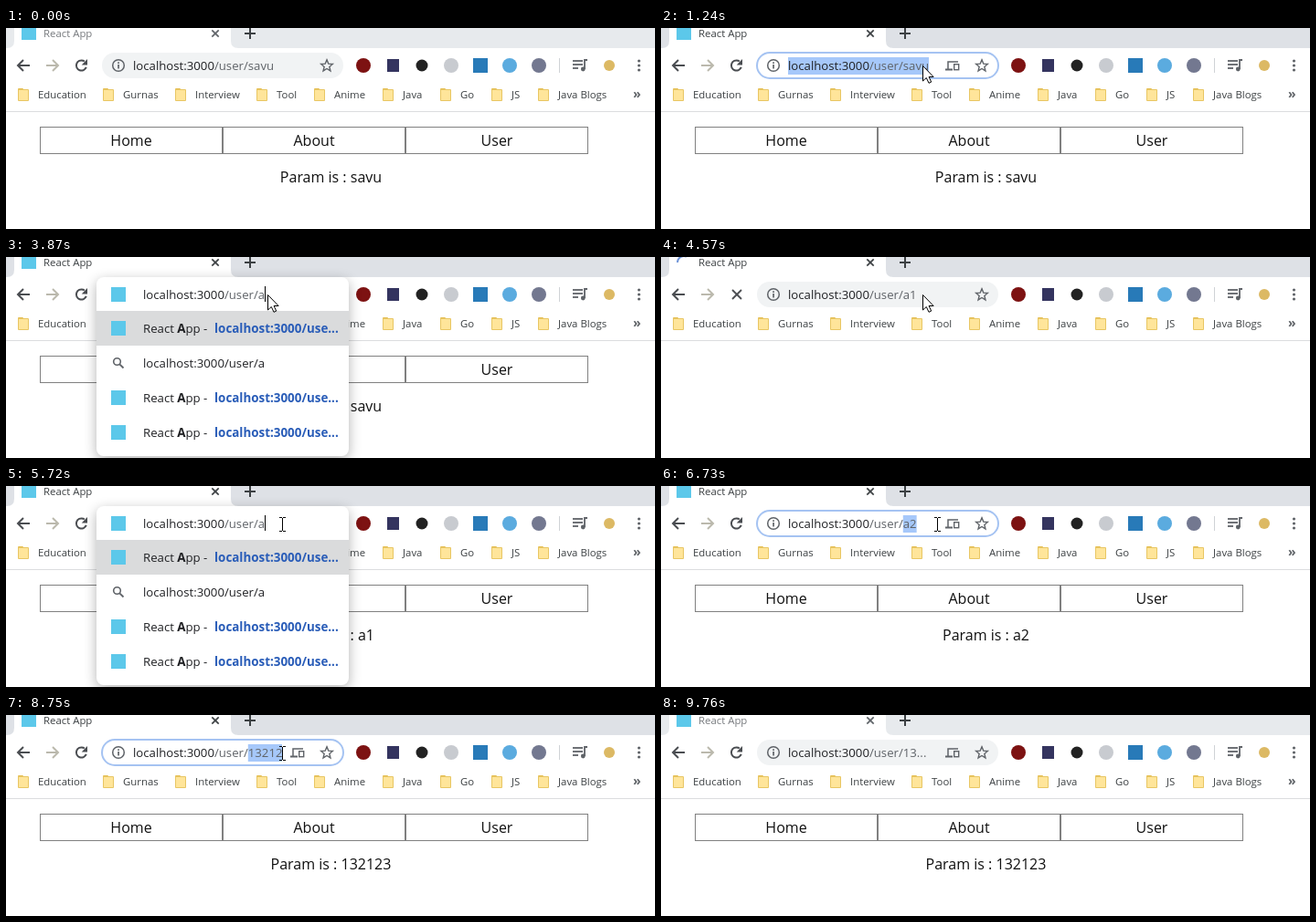
These frames come from a looping animation (710x220 px, 9830 ms). An HTML page with a canvas:

```html
<!DOCTYPE html>
<html lang="en">
<head>
<meta charset="utf-8">
<title>Route params</title>
<style>
  html, body { margin: 0; width: 100%; height: 100%; overflow: hidden; background: #fff; }
  canvas { display: block; }
</style>
</head>
<body>
<canvas id="stage" width="710" height="220"></canvas>
<script>
const ctx = document.getElementById('stage').getContext('2d');
const LOOP = 9830;
const BASE = 'localhost:3000/user/';
const HOST = 'localhost:3000';
const FIRST = 'savu';
const FAMILY = '"Open Sans", "Noto Sans", sans-serif';
const SMALL = '11.4px ' + FAMILY;
const URL_FONT = '13.2px ' + FAMILY;
const BOLD = 'bold 13.4px ' + FAMILY;
const PAGE = '16px ' + FAMILY;
const INK = '#202124', GREY = '#5f6368', MUTED = '#757575', LINK = '#2a5db8', APP = '#5cc8ea';

const BOOKMARKS = [
  [13, 'Education'], [106, 'Gurnas'], [185, 'Interview'], [274, 'Tool'], [337, 'Anime'],
  [412, 'Java'], [475, 'Go'], [531, 'JS'], [582, 'Java Blogs']
];

// Each entry changes only the listed properties from its time on.
const TIMELINE = [
  [0, { active: false, ring: false, send: false, tail: FIRST, sel: '', menu: '', caret: false,
        load: '', param: FIRST, elide: false }],
  [70, { active: true }],
  [500, { ring: true }],
  [780, { send: true }],
  [1240, { sel: 'all' }],
  [1470, { sel: 'tail' }],
  [2630, { tail: '', sel: '', menu: 'history', caret: true }],
  [3090, { caret: false }],
  [3640, { caret: true }],
  [3870, { tail: 'a', menu: 'match' }],
  [4020, { tail: 'a1', menu: 'plain' }],
  [4250, { menu: '', caret: false, ring: false, send: false, load: 'wait' }],
  [4410, { load: 'spin', param: '' }],
  [4720, { param: 'a1' }],
  [5030, { load: '' }],
  [5110, { ring: true, send: true }],
  [5190, { sel: 'tail' }],
  [5650, { tail: 'a', sel: '', menu: 'match', caret: true }],
  [5800, { tail: 'a2', menu: 'plain' }],
  [6110, { menu: '', caret: false, ring: false, send: false, load: 'wait' }],
  [6190, { load: 'spin', param: '' }],
  [6260, { param: 'a2' }],
  [6340, { load: '' }],
  [6570, { ring: true }],
  [6650, { send: true }],
  [6730, { sel: 'tail' }],
  [7270, { tail: '1', sel: '', menu: 'plain', caret: true }],
  [7350, { tail: '132' }],
  [7500, { tail: '132123' }],
  [7970, { menu: '', caret: false, ring: false, send: false, load: 'wait' }],
  [8045, { load: 'spin', param: '' }],
  [8120, { load: '', param: '132123' }],
  [8750, { ring: true, send: true, sel: 'tail' }],
  [9760, { active: false, ring: false, sel: '', elide: true }]
];

// Pointer: start time, shape, position, and optional move [x, y, duration].
const POINTER = [
  [0, ''],
  [70, 'arrow', 428, 143, [308, 48, 510]],
  [930, 'arrow', 302, 46, [286, 41, 160]],
  [1090, 'beam', 286, 41],
  [1240, 'arrow', 286, 41],
  [1470, 'beam', 286, 41],
  [1550, 'arrow', 286, 41],
  [5110, ''],
  [5340, 'beam', 286, 41],
  [5570, 'beam', 302, 41],
  [8830, 'arrow', 310, 48, [502, 181, 300]],
  [9210, '']
];

function stateAt(t) {
  const s = {};
  for (const [at, change] of TIMELINE) if (at <= t) Object.assign(s, change);
  return s;
}

function line(points, color, width = 2) {
  ctx.beginPath();
  points.forEach(([x, y], i) => i ? ctx.lineTo(x, y) : ctx.moveTo(x, y));
  ctx.strokeStyle = color;
  ctx.lineWidth = width;
  ctx.stroke();
}

function rect(x, y, w, h, color) {
  ctx.fillStyle = color;
  ctx.fillRect(x, y, w, h);
}

function round(x, y, w, h, r, color) {
  ctx.beginPath();
  ctx.roundRect(x, y, w, h, r);
  ctx.fillStyle = color;
  ctx.fill();
}

function dot(x, y, r, color) {
  ctx.beginPath();
  ctx.arc(x, y, r, 0, Math.PI * 2);
  ctx.fillStyle = color;
  ctx.fill();
}

function circle(x, y, r, color, width, from = 0, to = Math.PI * 2) {
  ctx.beginPath();
  ctx.arc(x, y, r, from, to);
  ctx.strokeStyle = color;
  ctx.lineWidth = width;
  ctx.stroke();
}

function cross(x, y, r, color, width) {
  line([[x - r, y - r], [x + r, y + r]], color, width);
  line([[x + r, y - r], [x - r, y + r]], color, width);
}

// Draws text and returns the x where it ends.
function text(str, x, y, font, color, align = 'left') {
  ctx.font = font;
  ctx.textAlign = align;
  ctx.fillStyle = color;
  ctx.fillText(str, x, y);
  return x + ctx.measureText(str).width;
}

function widthOf(str, font) {
  ctx.font = font;
  return ctx.measureText(str).width;
}

function drawTabs(s, t) {
  rect(0, 0, 710, 22, s.active ? '#dee1e6' : '#e7eaed');
  ctx.fillStyle = '#fff';
  ctx.beginPath();
  ctx.moveTo(1, 22);
  ctx.quadraticCurveTo(9, 22, 9, 14);
  ctx.lineTo(9, 0);
  ctx.lineTo(246, 0);
  ctx.lineTo(246, 14);
  ctx.quadraticCurveTo(246, 22, 254, 22);
  ctx.fill();
  if (s.load === 'spin') {
    const a = (t - 4570) / 160 + Math.PI;
    circle(25, 6, 7, '#6d93d8', 2, a, a + 2);
  } else if (!s.load) {
    rect(17, -2, 16, 15, APP);
  }
  const title = s.load === 'wait' ? BASE + s.tail : 'React App';
  text(title, 41, 10, SMALL, s.active ? '#3c4043' : '#777a7e');
  cross(229, 6, 3.7, s.active ? '#3c4043' : GREY, 1.7);
  line([[261, 6], [273, 6]], '#3c4043');
  line([[267, 0], [267, 12]], '#3c4043');
}

function drawStar(x, y) {
  const pts = [];
  for (let i = 0; i <= 11; i++) {
    const a = -Math.PI / 2 + i * Math.PI / 5, r = i % 2 ? 3 : 6.7;
    pts.push([x + r * Math.cos(a), y + 0.5 + r * Math.sin(a)]);
  }
  line(pts, GREY, 1.4);
}

function drawSend() {
  line([[314, 45], [314, 37], [325, 37]], GREY, 1.5);
  line([[311, 45.5], [319, 45.5]], GREY, 2);
  ctx.strokeStyle = GREY;
  ctx.lineWidth = 1.4;
  ctx.strokeRect(320.7, 39.7, 5, 6);
}

function drawToolbar(s) {
  const dark = '#4a4d51';
  line([[26, 41], [13, 41]], dark);
  line([[19, 35], [13, 41], [19, 47]], dark);
  line([[44, 41], [57, 41]], '#bbb9ad');
  line([[51, 35], [57, 41], [51, 47]], '#bbb9ad');
  if (s.load) {
    cross(83, 41, 5, dark, 1.8);
  } else {
    circle(82.5, 41, 5.6, dark, 2, 0.35, 5.35);
    ctx.beginPath();
    ctx.moveTo(89, 34);
    ctx.lineTo(89, 40.5);
    ctx.lineTo(82.7, 40.5);
    ctx.fillStyle = dark;
    ctx.fill();
  }

  dot(391, 41, 8, '#7d1212');
  rect(417, 34, 13, 14, '#34345f');
  dot(455, 41, 6.5, '#222');
  dot(487, 41, 8, '#c8cbd0');
  rect(511, 33, 16, 16, '#287ab8');
  dot(551, 41, 8, s.load === 'wait' ? '#929599' : '#5babdf');
  dot(583, 41, 8, '#737890');
  rect(605, 33, 1, 16, '#cfd2d6');

  for (const [y, x] of [[36, 631], [40, 631], [44, 626]]) line([[620, y], [x, y]], GREY, 1.8);
  line([[636, 35], [633, 35], [633, 45]], GREY, 1.8);
  dot(631.3, 45, 2.4, GREY);
  dot(660, 41, 6, '#dcb964');
  for (const y of [36, 41, 46]) dot(692.5, y, 1.6, GREY);

  for (const [x, label] of BOOKMARKS) {
    round(x, 66, 6, 4, 1, '#e5bf55');
    round(x, 67, 12, 13, 1, '#e8c663');
    rect(x + 1, 68, 10, 11, '#ffe59a');
    text(label, x + 22, 77, SMALL, '#3c4043');
  }
  text('»', 686, 77, 'bold 14px ' + FAMILY, GREY);
  rect(0, 91, 710, 1, '#dcdddf');
}

function drawUrl(s, x) {
  const full = BASE + s.tail;
  const end = x + widthOf(full, URL_FONT);
  ctx.save();
  ctx.beginPath();
  ctx.rect(x - 2, 27, (s.menu ? 364 : s.send ? 304 : 338) - x, 28);
  ctx.clip();
  if (s.sel) {
    const from = s.sel === 'all' ? x : x + widthOf(BASE, URL_FONT);
    rect(from, 32, end - from, 19, '#a6c8fa');
  }
  const shown = s.elide ? BASE + s.tail.slice(0, 2) + '...' : full;
  const mid = text(HOST, x, 46, URL_FONT, INK);
  text(shown.slice(HOST.length), mid, 46, URL_FONT, GREY);
  ctx.restore();
  if (s.caret) rect(Math.round(end), 32, 1, 17, '#000');
}

function drawPill(s) {
  if (s.ring) {
    round(104, 26, 266, 30, 15, '#a5c3f2');
    round(106, 28, 262, 26, 13, '#fff');
  } else {
    round(105, 27, 264, 28, 14, '#f1f3f4');
  }
  circle(123, 41, 6.3, GREY, 1.5);
  rect(122.2, 40, 1.7, 4.5, GREY);
  rect(122.2, 37.3, 1.7, 1.7, GREY);
  drawUrl(s, 139);
  if (s.send) drawSend();
  drawStar(351, 41);
}

function drawGlobe(y) {
  dot(123, y, 6.8, '#5f5f6b');
  ctx.fillStyle = '#fff';
  ctx.beginPath();
  ctx.moveTo(118, y - 2);
  ctx.lineTo(122, y + 1.5);
  ctx.lineTo(122, y + 5);
  ctx.lineTo(117.8, y + 1);
  ctx.moveTo(123, y - 5);
  ctx.lineTo(126, y - 4);
  ctx.lineTo(124, y - 1);
  ctx.lineTo(127, y + 1);
  ctx.lineTo(127, y + 3.5);
  ctx.lineTo(124.5, y + 1.5);
  ctx.lineTo(120.5, y - 1.5);
  ctx.fill();
}

function drawSearch(y) {
  circle(121.5, y - 1.5, 3.8, GREY, 1.6);
  line([[124.3, y + 1.3], [128.5, y + 5.5]], GREY, 1.8);
}

function drawPageRow(y, marked) {
  rect(115, y - 8, 16, 16, APP);
  let x = 150;
  if (marked) {
    x = text('React ', x, y + 5, URL_FONT, INK);
    x = text('A', x, y + 5, BOLD, INK);
    text('pp -', x, y + 5, URL_FONT, INK);
  } else {
    text('React App -', x, y + 5, URL_FONT, INK);
  }
  text(BASE.slice(0, -2) + '...', marked ? 228 : 227, y + 5, BOLD, LINK);
}

function drawMenu(s) {
  const rows = s.menu === 'plain' ? 2 : 4;
  const match = s.menu === 'match';
  ctx.save();
  ctx.shadowColor = 'rgba(0,0,0,.3)';
  ctx.shadowBlur = 14;
  ctx.shadowOffsetY = 4;
  round(99, 22, 276, 44 + rows * 38, 8, '#fff');
  ctx.restore();
  rect(99, 59, 276, 38, '#dadbdc');

  if (match) rect(115, 33, 16, 16, APP);
  else drawGlobe(41);
  drawUrl(s, 150);

  if (match) {
    drawPageRow(78, true);
  } else {
    drawGlobe(78);
    text(BASE + s.tail, 150, 83, BOLD, LINK);
  }
  drawSearch(116);
  const end = text(BASE + s.tail, 150, 121, URL_FONT, INK);
  if (s.menu === 'history') text(' - Vodelu Ar...', end, 121, URL_FONT, MUTED);
  if (rows === 4) for (const y of [154, 192]) drawPageRow(y, match);
}

function drawPage(s) {
  if (!s.param) return;
  ctx.strokeStyle = '#808080';
  ctx.lineWidth = 1;
  ['Home', 'About', 'User'].forEach((label, i) => {
    const x = 37 + i * 200;
    ctx.strokeRect(x + 0.5, 108.5, 199, 29);
    text(label, x + 100, 129, PAGE, '#111', 'center');
  });
  text('Param is : ' + s.param, 355.5, 169, PAGE, '#111', 'center');
}

function drawPointer(t) {
  const [at, shape, x0, y0, move] = POINTER.filter(p => p[0] <= t).pop();
  if (!shape) return;
  let x = x0, y = y0;
  if (move) {
    const k = Math.min(1, (t - at) / move[2]);
    const e = k * k * (3 - 2 * k);
    x += (move[0] - x0) * e;
    y += (move[1] - y0) * e;
  }
  ctx.save();
  ctx.translate(Math.round(x), Math.round(y));
  if (shape === 'arrow') {
    ctx.beginPath();
    [[0, 0], [0, 16.5], [3.8, 13], [6.5, 18.8], [9.2, 17.6], [6.6, 12], [11.6, 12]]
      .forEach(([px, py]) => ctx.lineTo(px + 0.5, py + 0.5));
    ctx.closePath();
    ctx.fillStyle = '#fff';
    ctx.fill();
    ctx.strokeStyle = '#000';
    ctx.lineWidth = 1;
    ctx.stroke();
  } else {
    rect(0, -6, 1, 14, '#000');
    for (const py of [-7, 8]) {
      rect(-3, py, 3, 1, '#000');
      rect(1, py, 3, 1, '#000');
    }
  }
  ctx.restore();
}

function draw(t) {
  const s = stateAt(t);
  rect(0, 0, 710, 220, '#fff');
  drawTabs(s, t);
  drawToolbar(s);
  drawPage(s);
  if (s.menu) drawMenu(s);
  else drawPill(s);
  drawPointer(t);
}

const start = performance.now();
function tick() {
  draw((performance.now() - start) % LOOP);
  requestAnimationFrame(tick);
}
tick();
</script>
</body>
</html>
```
